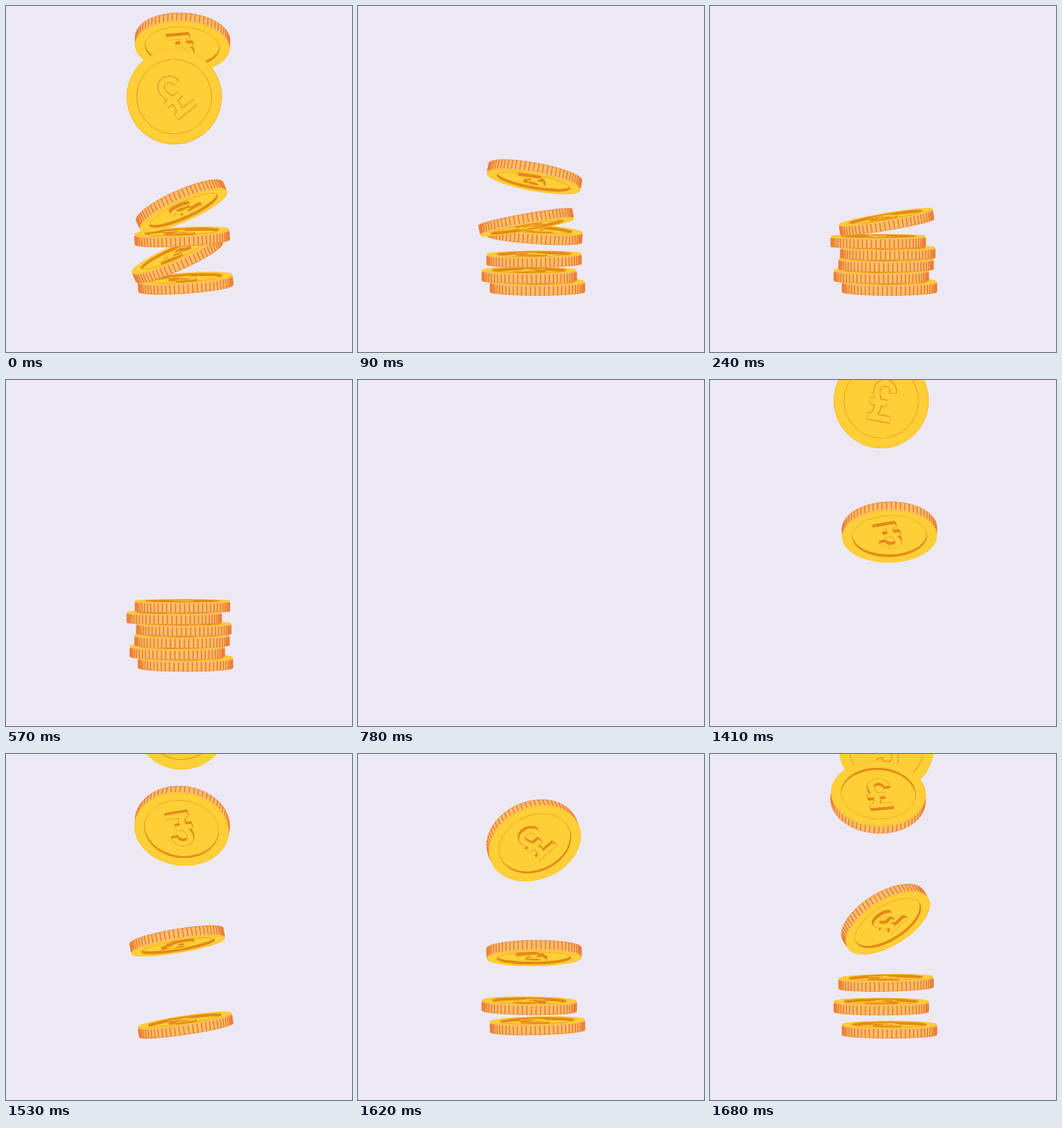
Animation, 400 px wide and 400 px high, one loop 1.71 s. Source, as an HTML page with a canvas:

```html
<!DOCTYPE html>
<html lang="en">
<head>
<meta charset="utf-8">
<title>Falling coins</title>
<style>
  html, body { margin: 0; width: 100%; height: 100%; overflow: hidden; background: #ece9f5; }
  canvas { display: block; width: 100vw; height: 100vh; }
</style>
</head>
<body>
<canvas id="stage" width="400" height="400"></canvas>
<script>
const ctx = document.getElementById("stage").getContext("2d");
const rad = Math.PI / 180;
const LOOP = 1710, STEP = 30, ENTRY = 1290, DROP = 960;
const R = 54.5, THICK = 12, RING = 43, DEPTH = 3;
const FACE = "#ffcf38", DARK = "#e28a17", LINE = "#f2a02a";
const RIM = "#fdc068", GROOVE = "#ea8138", EDGE = "#f0935a";

// Each key: time since the first coin enters, y, roll and pitch in degrees.
// Pitch 0 faces the viewer; near -90 the coin lies flat.
const coins = [
  { x: 207.5, spin: 165, keys: [[0, -22, 8, -15], [210, 324, -8, -88], [240, 313.5, -8.5, -95],
    [300, 312, -2, -95], [390, 318.7, 0, -94], [420, 320.5, -4, -96], [480, 324.5, 0, -94.2]] },
  { x: 198, spin: 20, keys: [[60, -72, -10, 40], [240, 216, -9.5, -82], [295, 302, -4, -93],
    [340, 288, 2, -95], [390, 292, 0, -94], [420, 291, -24, -99], [510, 311.4, 0, -93.7]] },
  { x: 203.5, spin: 158, keys: [[145, -70, 10, 40], [240, 83, 8, -40], [355, 271, -3, -92],
    [390, 264.5, -1, -94], [420, 267, -3, -95], [530, 298.3, 0, -93.2]] },
  { x: 204.5, spin: -23, keys: [[215, -75, 0, 20], [240, -37, -10, -10], [390, 191, -32, -62],
    [420, 231, -24, -77], [465, 268, -8, -92], [510, 264, 4, -95], [570, 285.2, 0, -92.6]] },
  { x: 194.5, spin: -12, keys: [[320, -75, 10, 120], [390, 50, 3, 47], [420, 105, -27, 2],
    [510, 250, -10, -86], [555, 250, 6, -95], [620, 272.1, 0, -92.1]] },
  { x: 204, spin: 165, keys: [[350, -75, 0, 30], [390, -9, 0, -15], [420, 42, 3, -58],
    [530, 232, 12, -84], [590, 234, -12, -98], [660, 249.5, -9.5, -94], [730, 256, 3, -93],
    [800, 257, -2.5, -92], [880, 258.5, 1, -91.7], [960, 259, 0, -91.6]] }
];

function poseAt(keys, time) {
  const next = keys.findIndex(key => key[0] > time);
  if (next === 0) return keys[0];
  if (next < 0) return keys[keys.length - 1];
  const a = keys[next - 1], b = keys[next];
  const k = (time - a[0]) / (b[0] - a[0]);
  return a.map((v, i) => v + (b[i] - v) * k);
}

function ellipse(y, radius, squash) {
  ctx.beginPath();
  ctx.ellipse(0, y, radius, radius * squash, 0, 0, 2 * Math.PI);
}

function fill(color) {
  ctx.fillStyle = color;
  ctx.fill();
}

function stroke(color, width) {
  ctx.strokeStyle = color;
  ctx.lineWidth = width;
  ctx.stroke();
}

const pound = new Path2D("M12-11C11-25-7-25-7-11C-7-5-3 0-3 8C-3 14-6 18-9 20M-13 20H14M-13 2H7");

function drawPound(y, squash, spin, layers) {
  ctx.save();
  ctx.translate(0, y);
  ctx.scale(1, squash);
  ctx.rotate(spin * rad);
  for (const [color, width] of layers) {
    ctx.strokeStyle = color;
    ctx.lineWidth = width;
    ctx.stroke(pound);
  }
  ctx.restore();
}

function drawRim(front, back, squash, away) {
  ellipse(back, R, squash);
  fill(RIM);
  stroke(EDGE, 0.8);
  ctx.fillStyle = RIM;
  ctx.fillRect(-R, Math.min(front, back), 2 * R, Math.abs(back - front));
  ctx.beginPath();
  for (let i = 0.5; i < 32; i++) {
    const angle = i * Math.PI / 32;
    const x = R * Math.cos(angle);
    const y = away * R * squash * Math.sin(angle);
    ctx.moveTo(x, y + front + (back - front) * 0.14);
    ctx.lineTo(x, y + back);
  }
  stroke(GROOVE, 1.5);
}

function drawCoin(x, y, roll, pitch, spin) {
  const flip = Math.cos(pitch * rad) < 0 ? -1 : 1;
  const squash = flip * Math.cos(pitch * rad);
  const lean = flip * Math.sin(pitch * rad);
  const front = -lean * THICK / 2;

  ctx.save();
  ctx.translate(x, y);
  ctx.rotate(roll * rad);
  drawRim(front, -front, squash, Math.sign(lean));
  ellipse(front, R, squash);
  fill(FACE);
  stroke("#ffc328", 0.9);

  // Recessed floor with a raised pound sign.
  ellipse(front, RING, squash);
  fill(DARK);
  stroke(DARK, 0.8);
  ctx.clip();
  ellipse(front + lean * DEPTH, RING, squash);
  fill(FACE);
  for (let h = DEPTH + 1; h > 0; h -= 0.5) {
    drawPound(front + lean * h, squash, spin, [[DARK, 8]]);
  }
  drawPound(front, squash, spin, [[LINE, 8], [FACE, 6.4]]);
  ctx.restore();
}

function draw(now) {
  const clock = Math.floor(now % LOOP / STEP) * STEP;
  const time = (clock + LOOP - ENTRY) % LOOP;
  const fall = time > DROP ? 2.35 * ((time - DROP) / STEP) ** 2 : 0;
  // The last coin passes behind its neighbour on the way down.
  const order = time < 480 ? [0, 1, 2, 3, 5, 4] : [0, 1, 2, 3, 4, 5];

  ctx.fillStyle = "#ece9f5";
  ctx.fillRect(0, 0, 400, 400);
  for (const i of order) {
    const { x, spin, keys } = coins[i];
    const [, y, roll, pitch] = poseAt(keys, time);
    const landed = i === 3 ? Math.min(1, Math.max(0, (time - 420) / 150)) : 0;
    drawCoin(x - (i === 3 ? 1.5 : 0) + 2.5 * landed, y + fall, roll, pitch, spin);
  }
}

const start = performance.now();
function tick() {
  draw(performance.now() - start);
  requestAnimationFrame(tick);
}
tick();
</script>
</body>
</html>
```
